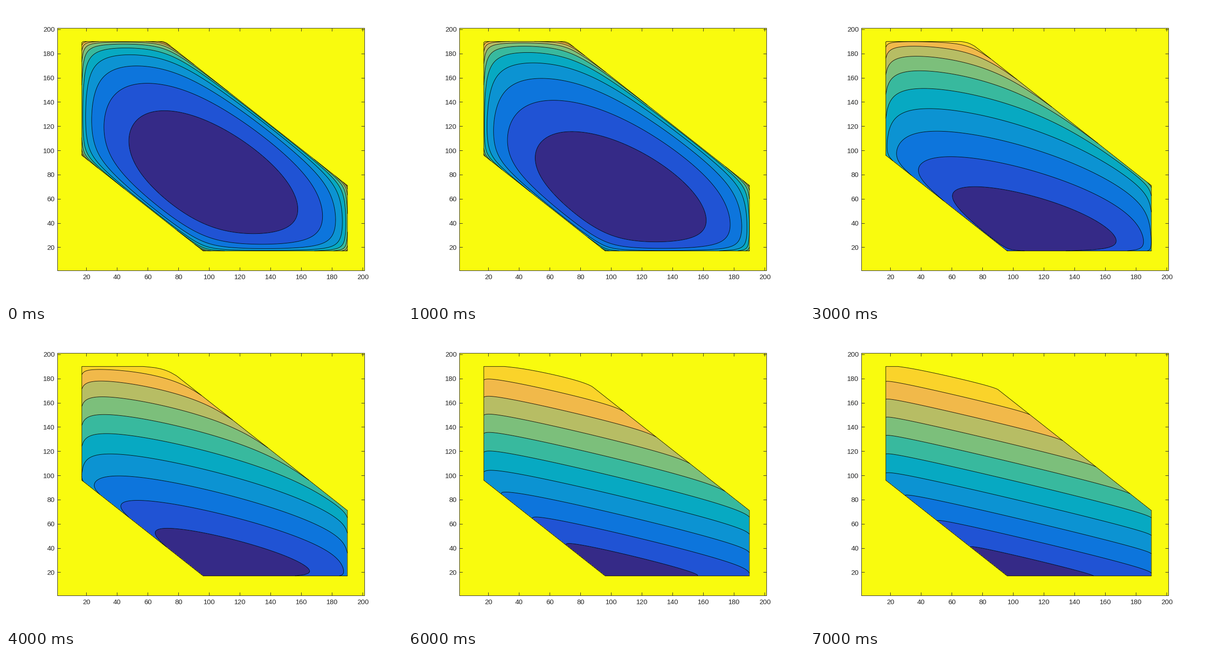
Write a matplotlib script that moves like this. It is 864 by 648 pixels and loops after 8 s.

```python
import numpy as np
import matplotlib.pyplot as plt
from matplotlib.animation import FuncAnimation

W, H = 864, 648
N = 201            # grid points per side
STEPS = 8          # barrier weight doubles at every step
BANDS = 11
WALL = 1e9         # stands for infinity outside the feasible region
INK = "#262626"
COLORS = ["#352a87", "#2053d4", "#0d75dc", "#0c93d2", "#07a9c2", "#38b99e",
          "#7cbf7b", "#b7bd64", "#f1b94a", "#fad32a", "#f9fb0e"]
LINE = dict(colors="black", linewidths=0.9, linestyles="solid")

plt.rcParams["font.family"] = "Liberation Sans"

fig = plt.figure(figsize=(W / 72, H / 72), dpi=72, facecolor="white")
ax = fig.add_axes([111.7 / W, 71.4 / H, 670.1 / W, 528.3 / H])
ax.set_facecolor(COLORS[-1])
ax.set_xlim(1, N)
ax.set_ylim(1, N)
ticks = range(20, 201, 20)
ax.set_xticks(ticks)
ax.set_yticks(ticks)
ax.tick_params(direction="in", length=7, width=1, color=INK, labelcolor=INK,
               labelsize=15, top=True, right=True)
ax.tick_params(axis="x", pad=8)
ax.tick_params(axis="y", pad=5.5)
for spine in ax.spines.values():
    spine.set(color=INK, linewidth=1)

# Slack of each linear constraint; the region is where all are positive.
x, y = np.meshgrid(np.arange(1, N + 1), np.arange(1, N + 1))
slacks = np.array([x - 16, 191 - x, y - 16, 191 - y,
                   x + y - 112, 262 - x - y])
inside = (slacks > 0).all(axis=0)
barrier = -np.log(np.maximum(slacks, 1)).sum(axis=0)
cost = 0.3 * x + y

layers = []


def draw(step):
    while layers:
        layers.pop().remove()
    value = 0.0125 * 2 ** step * cost + barrier
    low, high = value[inside].min(), value[inside].max()
    levels = np.linspace(low, high, BANDS + 1)[1:-1]
    walled = np.where(inside, value, WALL)
    region = np.ma.masked_where(~inside, value)
    edges = [low - 1, *levels, 2 * WALL]
    layers.append(ax.contourf(x, y, walled, levels=edges, colors=COLORS))
    layers.append(ax.contour(x, y, region, levels=levels[:-1], **LINE))
    # The top level also follows the walls, so it outlines the region once.
    layers.append(ax.contour(x, y, walled, levels=levels[-1:], **LINE))
    return layers


anim = FuncAnimation(fig, draw, frames=STEPS, init_func=lambda: draw(0),
                     interval=1000, repeat=True, repeat_delay=0)
plt.show()
```
